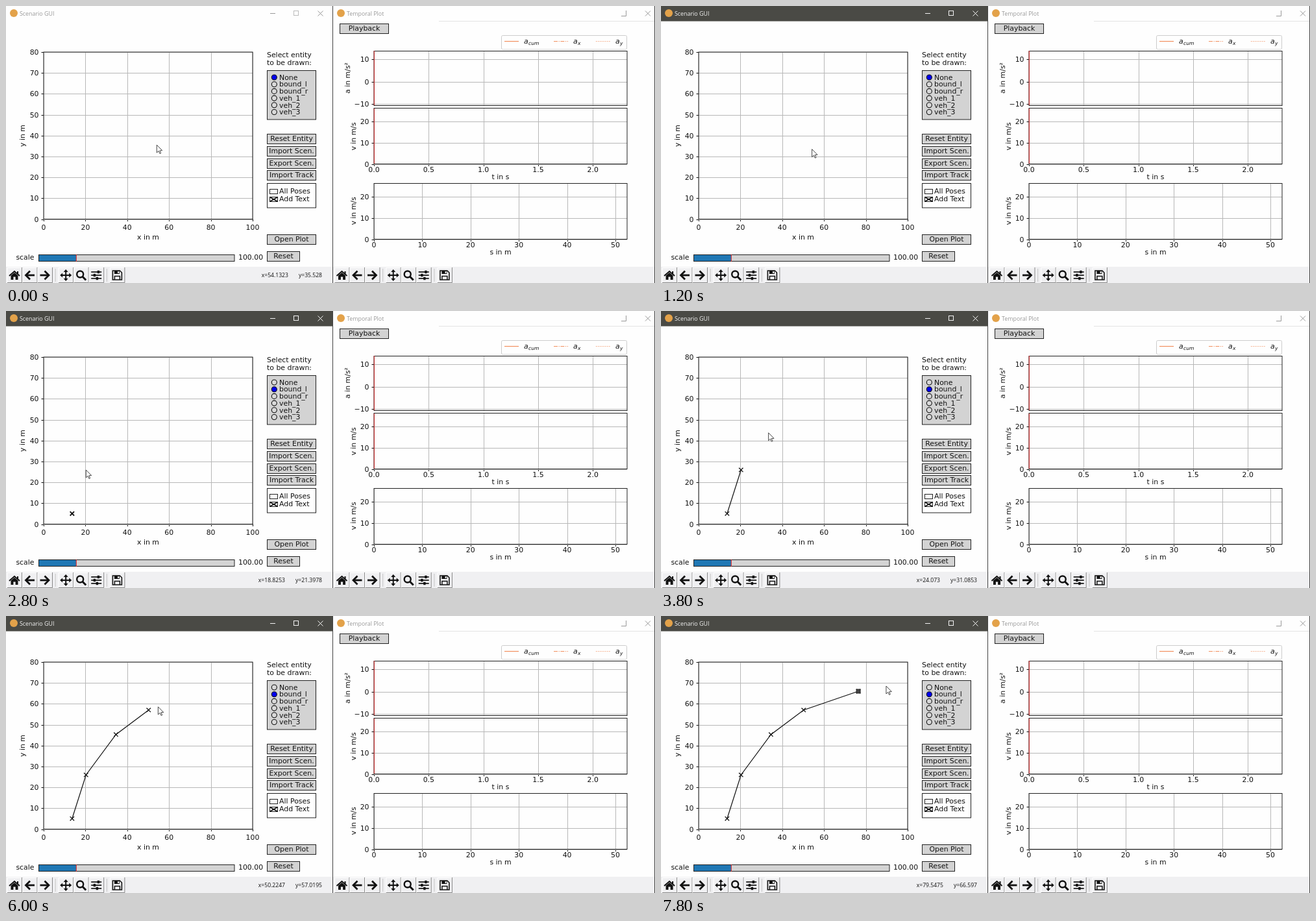
An HTML page with a canvas that plays this animation: 1000 by 427 pixels, repeating every 8 s.

```html
<!DOCTYPE html>
<html lang="en">
<head>
<meta charset="utf-8">
<title>Scenario GUI</title>
<style>
html, body { margin: 0; width: 100%; height: 100%; overflow: hidden; background: #fefefe; }
canvas { display: block; }
</style>
</head>
<body>
<canvas id="stage" width="1000" height="427"></canvas>
<script>
const ctx = document.getElementById('stage').getContext('2d');
const LOOP = 8000, STEP = 200;
const LAG = 400; // the GUI redraws this long after the pointer acts
const PLOT = '10.9px "DejaVu Sans", sans-serif';
const UI = '"Open Sans", sans-serif';
const INK = '#111';

const toX = metres => 58 + metres * 3.22;
const toY = metres => 328.5 - metres * 3.219;

// Pointer stops: [arrive ms, leave ms, x metres, y metres]
const stops = [
  [0, 0, 54.1323, 35.528],
  [1000, 1000, 109.3, 64.8],
  [1600, 1600, 10.1725, 8.41952],
  [2000, 2000, 13.6234, 5.0347],
  [2750, 3300, 20.2736, 25.9534],
  [4000, 4500, 34.5946, 45.2969],
  [5500, 5900, 50.2247, 57.0195],
  [7000, 7340, 76.4238, 66.0141],
  [7820, LOOP, 89.7516, 68.5013]];
const clicks = stops.slice(3, 8);

function pointerAt(t) {
  const i = stops.findLastIndex(stop => stop[0] <= t);
  const [, leave, x, y] = stops[i];
  if (t <= leave) return [x, y];
  const [arrive, , nextX, nextY] = stops[i + 1];
  const eased = 1 - (1 - (t - leave) / (arrive - leave)) ** 2;
  return [x + (nextX - x) * eased, y + (nextY - y) * eased];
}

function text(s, x, y, align = 'left', font = PLOT, color = INK) {
  ctx.font = font;
  ctx.textAlign = align;
  ctx.fillStyle = color;
  ctx.fillText(s, x, y);
}

function vertical(s, x, y) {
  ctx.save();
  ctx.translate(x, y);
  ctx.rotate(-Math.PI / 2);
  text(s, 0, 0, 'center');
  ctx.restore();
}

function path(pts, color = INK, width = 1, dash = []) {
  ctx.beginPath();
  pts.forEach(p => ctx.lineTo(...p));
  ctx.strokeStyle = color;
  ctx.lineWidth = width;
  ctx.setLineDash(dash);
  ctx.stroke();
  ctx.setLineDash([]);
}

function fill(pts, color = INK) {
  ctx.beginPath();
  pts.forEach(p => ctx.lineTo(...p));
  ctx.fillStyle = color;
  ctx.fill();
}

function rect(x, y, w, h, color = INK) {
  ctx.fillStyle = color;
  ctx.fillRect(x, y, w, h);
}

function outline(x, y, w, h, color = '#222') {
  ctx.strokeStyle = color;
  ctx.lineWidth = 1;
  ctx.strokeRect(x, y, w, h);
}

function box(x, y, w, h, color) {
  rect(x, y, w, h, color);
  outline(x, y, w, h);
}

function ring(x, y, r, color, width) {
  ctx.beginPath();
  ctx.arc(x, y, r, 0, 7);
  ctx.strokeStyle = color;
  ctx.lineWidth = width;
  ctx.stroke();
}

function disc(x, y, r, color) {
  ctx.beginPath();
  ctx.arc(x, y, r, 0, 7);
  ctx.fillStyle = color;
  ctx.fill();
}

function cross(x, y, rx, ry = rx, width = 1.3, color = INK) {
  path([[x - rx, y - ry], [x + rx, y + ry]], color, width);
  path([[x - rx, y + ry], [x + rx, y - ry]], color, width);
}

function button(label, x, y, w = 75, h = 15) {
  box(x, y, w, h, '#d3d3d3');
  text(label, x + w / 2, y + h / 2 + 3.2, 'center');
}

const ticks = (n, start, gap, label) =>
  Array.from({ length: n }, (_, i) => [start + i * gap, label(i)]);
const tens = i => `${i * 10}`;

// Ticks are [position, label]; an empty label leaves out the x tick mark.
function axes(x0, y0, x1, y1, xTicks, yTicks, labelGap = 12.5) {
  const snap = v => Math.round(v) + 0.5;
  for (const [x, label] of xTicks) {
    path([[snap(x), y0], [snap(x), y1]], '#b8b8b8');
    if (label) path([[snap(x), y1], [snap(x), y1 + 3.5]]);
    text(label, x, y1 + labelGap, 'center');
  }
  for (const [y, label] of yTicks) {
    path([[x0, snap(y)], [x1, snap(y)]], '#b8b8b8');
    path([[x0 - 3.5, snap(y)], [x0, snap(y)]]);
    text(label, x0 - 7.5, y + 4, 'right');
  }
  outline(x0, y0, x1 - x0, y1 - y0);
}

function titleBar(x, title, active) {
  const ink = active ? '#f4f4f4' : '#999';
  if (active) rect(x, 0, 503, 23.5, '#4a4a45');
  disc(x + 12, 11, 6, '#e3a24a');
  text(title, x + 21, 15, 'left', '8.9px ' + UI, ink);
  if (x) path([[955.5, 7], [955.5, 15.5], [948, 15.5]], ink);
  else {
    path([[407, 11.5], [415, 11.5]], ink);
    outline(443.5, 7.5, 7, 7, active ? ink : '#bbb');
  }
  cross(x ? 989 : 484.5, 11.5, 4, 4, 1, ink);
}

const icons = {
  home() {
    path([[-8, 1], [0, -6], [8, 1]], INK, 2);
    fill([[-5.5, 0.5], [0, -4], [5.5, 0.5], [5.5, 7], [-5.5, 7]]);
    rect(-1.6, 2.5, 3.2, 4.5, '#f0f0f2');
    rect(4, -6, 2, 4);
  },
  back() {
    path([[0.5, -6.5], [-6, 0], [0.5, 6.5]], INK, 2.8);
    path([[-5, 0], [7.5, 0]], INK, 2.8);
  },
  forward() {
    ctx.scale(-1, 1);
    icons.back();
  },
  pan() {
    for (let i = 0; i < 4; i++) {
      ctx.rotate(Math.PI / 2);
      path([[0, 0], [6, 0]], INK, 2);
      fill([[5, -3.5], [9, 0], [5, 3.5]]);
    }
  },
  zoom() {
    ring(-1.5, -1.5, 5, INK, 2.4);
    path([[2, 2], [7.5, 7.5]], INK, 3);
  },
  sliders() {
    [3, -3, 1].forEach((knob, i) => {
      const y = i * 5 - 5;
      path([[-8, y], [8, y]], INK, 1.7);
      rect(knob - 1.5, y - 2.2, 3.4, 4.4);
    });
  },
  save() {
    path([[-7, -7], [4, -7], [7, -4], [7, 7], [-7, 7], [-7, -7.7]], INK, 1.6);
    rect(-4.5, -7, 8, 5);
    rect(0.7, -6, 2, 3, '#f4f4f4');
    path([[-4, 7], [-4, 1.5], [4, 1.5], [4, 7]], INK, 1.5);
  }
};

function toolbar(x0) {
  rect(x0, 402, x0 ? 496 : 503, 25, '#f0f0f2');
  Object.values(icons).forEach((drawIcon, i) => {
    const group = Math.floor(i / 3), x = x0 + 13 + i * 23.5 + group * 8.7;
    path([[x - 11, 426], [x - 11, 403.5], [x + 11, 403.5]], '#fff');
    path([[x + 11.5, 403], [x + 11.5, 426.5], [x - 11, 426.5]], '#888');
    if (group && i % 3 === 0) path([[x - 16, 405], [x - 16, 425]], '#c4c4c4');
    ctx.save();
    ctx.translate(x, 415);
    drawIcon();
    ctx.restore();
  });
}

function readout(t) {
  const [x, y] = pointerAt(Math.max(0, t - LAG)).map(v => +v.toPrecision(6));
  if (x > 100) return;
  const font = '8.6px ' + UI;
  text(`y=${y}`, 487, 418, 'right', font);
  text(`x=${x}`, 471 - ctx.measureText(`y=${y}`).width, 418, 'right', font);
}

function scenarioWindow(t) {
  titleBar(0, 'Scenario GUI', t >= 1200);
  axes(58, 71, 380, 328.5, ticks(6, 58, 64.4, i => `${i * 20}`), ticks(9, 328.5, -32.19, tens), 16.5);
  text('x in m', 219, 360, 'center');
  vertical('y in m', 29, 200);

  text('Select entity', 402, 79);
  text('to be drawn:', 402, 91);
  box(402.5, 99.5, 75, 75.5, '#d3d3d3');
  const chosen = t >= stops[1][0] + LAG ? 1 : 0;
  ['None', 'bound_l', 'bound_r', 'veh_1', 'veh_2', 'veh_3'].forEach((name, i) => {
    const y = 110 + i * 10.7;
    disc(413.3, y, 4, i === chosen ? '#0000f0' : '#d9d9d9');
    ring(413.3, y, 4, INK, 1.1);
    text(name, 421, y + 3.7);
  });

  ['Reset Entity', 'Import Scen.', 'Export Scen.', 'Import Track'].forEach((label, i) =>
    button(label, 402.5, 197.5 + Math.round(i * 18.8)));
  outline(402.5, 273.5, 75, 37.5);
  ['All Poses', 'Add Text'].forEach((label, i) => {
    outline(406.5, 282.5 + i * 12, 12, 7);
    text(label, 421, 289 + i * 12.2);
  });
  cross(412.5, 298, 6, 3.5, 1.6);
  button('Open Plot', 402.5, 352.5);
  button('Reset', 402.5, 378.5, 50);

  text('scale', 43.5, 391, 'right');
  box(50.5, 383.5, 301.5, 10, '#d3d3d3');
  rect(51, 384, 57, 9, '#1f77b4');
  path([[108.3, 383], [108.3, 394]], '#e02020');
  text('100.00', 358, 391);

  toolbar(0);
  readout(t);
}

function legend() {
  ctx.beginPath();
  ctx.roundRect(763.5, 45.5, 193, 21.5, 2);
  ctx.strokeStyle = '#ccc';
  ctx.lineWidth = 1;
  ctx.stroke();
  const entries = [[768, 'cum', []], [844, 'x', [6, 1.6, 1.2, 1.6]], [909, 'y', [1.2, 1.7]]];
  for (const [x, sub, dash] of entries) {
    path([[x, 54.5], [x + 22, 54.5]], '#f2905f', 1.2, dash);
    text('a', x + 30, 58, 'left', 'italic ' + PLOT);
    text(sub, x + 37, 60, 'left', 'italic 7.6px "DejaVu Sans", sans-serif');
  }
}

function plotWindow() {
  titleBar(504, 'Temporal Plot', false);
  path([[667, 23.5], [999, 23.5]], '#e4e4e4');
  button('Playback', 514.5, 27.5);
  legend();

  axes(567, 69.5, 957, 153.5, ticks(5, 567, 84.3, () => ''),
    ticks(3, 151, -34.3, i => ['−10', '0', '10'][i]));
  axes(567, 157.5, 957, 243.5, ticks(5, 567, 84.3, i => (i / 2).toFixed(1)), ticks(3, 243.5, -32.8, tens));
  axes(567, 273.5, 957, 359.5, ticks(6, 567, 74.4, tens), ticks(3, 359.5, -32.8, tens));
  path([[567.3, 69], [567.3, 153]], '#e03030');
  path([[567.3, 158], [567.3, 243]], '#e03030');
  vertical('a in m/s²', 529.5, 111);
  vertical('v in m/s', 539, 201);
  vertical('v in m/s', 539, 316);
  text('t in s', 762, 267, 'center');
  text('s in m', 762, 383, 'center');
  toolbar(504.5);
}

function boundary(t) {
  const shown = clicks.filter(([arrive]) => t >= arrive + LAG)
    .map(([, , x, y]) => [toX(x), toY(y)]);
  path(shown, INK, 1.2);
  shown.forEach(([x, y]) => cross(x, y, 3.2, 3.2, shown.length === 1 ? 1.8 : 1.3));
  if (shown.length === clicks.length) {
    const [x, y] = shown.at(-1);
    box(x - 3, y - 3, 6, 6, '#444');
  }
}

function pointer(t) {
  const [x, y] = pointerAt(t);
  const shape = [[0, 0], [0, 12], [2.8, 9.4], [4.7, 13.5], [6.4, 12.8], [4.6, 8.8], [8.4, 8.6], [0, 0]]
    .map(([dx, dy]) => [toX(x) + dx, toY(y) + dy]);
  fill(shape, '#fff');
  path(shape, '#333', 0.9);
}

function draw() {
  const t = Math.floor(performance.now() % LOOP / STEP) * STEP;
  rect(0, 0, 1000, 427, '#fefefe');
  scenarioWindow(t);
  plotWindow();
  for (const x of [503.5, 999.5]) path([[x, 0], [x, 427]], '#444');
  boundary(t);
  pointer(t);
  requestAnimationFrame(draw);
}
draw();
</script>
</body>
</html>
```
